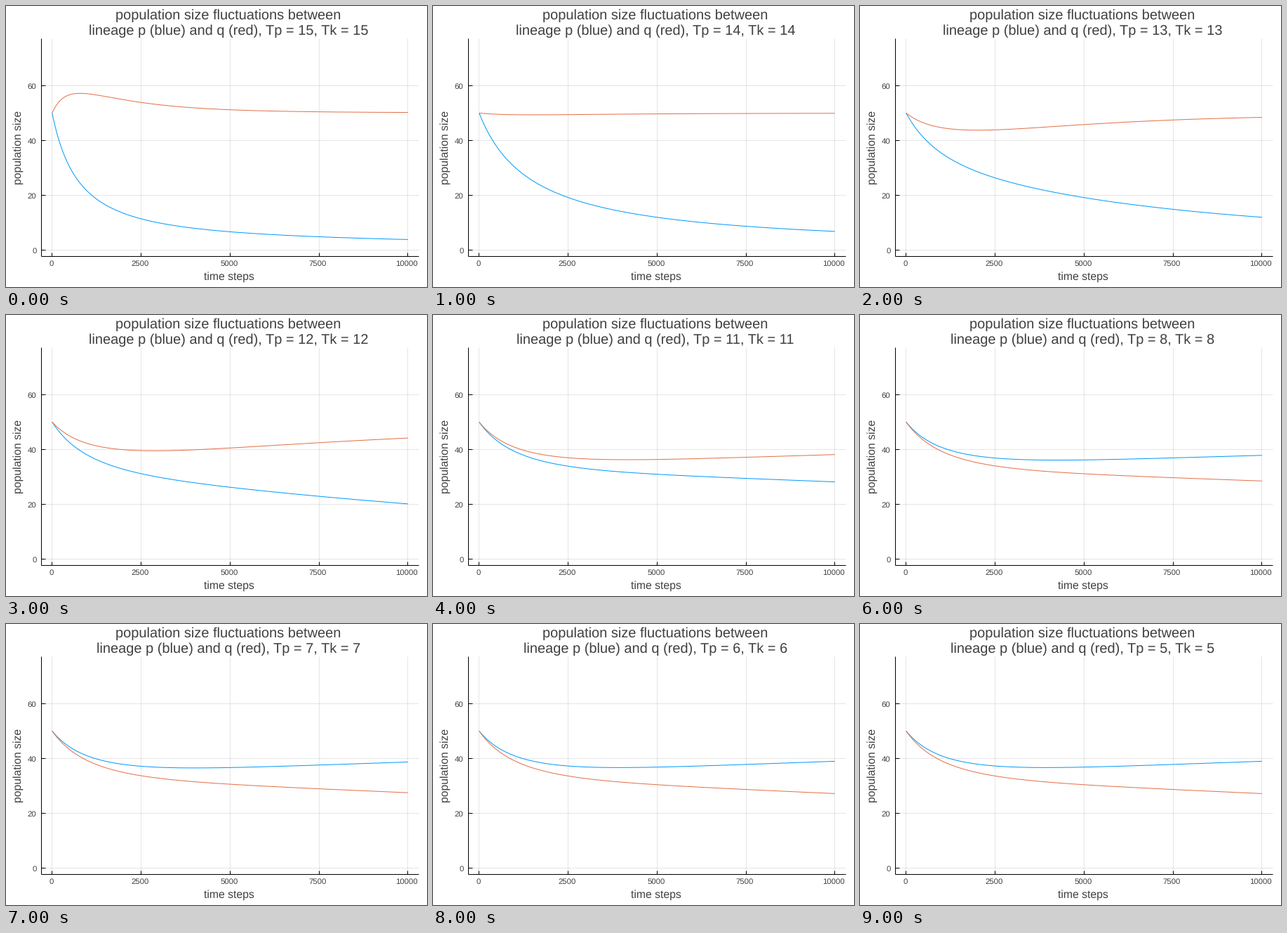
Recreate the animation shown at these times as a matplotlib script. Size 600x400 px, loop 10000 ms.

```python
import numpy as np
import matplotlib.pyplot as plt
from matplotlib.animation import FuncAnimation

W, H, DPI = 600, 400, 100
BLUE, RED, INK = "#009afa", "#e36f47", "#404040"

START, CAPACITY, GROWTH = 50, 50, 0.00069
STEPS, DT = 10000, 20
TEMPS = [t for t in range(15, 4, -1) if t != 10]

plt.rcParams["font.family"] = "Liberation Sans"
plt.rcParams["text.hinting"] = "none"


def advantage(temp):
    """Edge of lineage q over p; it vanishes at 10 and climbs steeply above."""
    x = temp - 10
    return 0.32 * (max(x + 3.8, 0) / (6.3 - x)) ** 1.5 - 0.15


def rates(p, q, temp):
    total = p + q
    skew = (max(temp - 10, 0) / 4) ** 3
    shift = advantage(temp) * (p * q / total) ** 2 * (2 * q / total) ** -skew
    scale = GROWTH / CAPACITY
    dp = scale * (p * (CAPACITY - p - q * q / total) - shift)
    dq = scale * (q * (CAPACITY - q - p * p / total) + shift)
    return np.array([dp, dq])


def simulate(temp):
    """Sizes of p and q over time, by the midpoint rule."""
    n = np.array([START, START], float)
    track = [n]
    for _ in range(STEPS // DT):
        mid = n + rates(*n, temp) * DT / 2
        n = n + rates(*mid, temp) * DT
        track.append(n)
    return np.transpose(track)


def px(t):
    return 65.8 + 0.0507 * t


def py(n):
    return 347.4 - 3.9 * n


def pt(pixels):
    return pixels * 72 / DPI


fig = plt.figure(figsize=(W / DPI, H / DPI), dpi=DPI, facecolor="white")
ax = fig.add_axes([0, 0, 1, 1])
ax.set_xlim(0, W)
ax.set_ylim(H, 0)
ax.axis("off")

LEFT, RIGHT, TOP, BOTTOM = 50, 588, 46, 356


def stroke(xs, ys, color="black", alpha=1, z=3):
    return ax.plot(xs, ys, color=color, alpha=alpha, lw=pt(1), zorder=z,
                   solid_capstyle="butt")[0]


def label(x, y, text, size, ha="center", **kw):
    return ax.text(x, y, text, fontsize=pt(size), color=INK, ha=ha,
                   va="baseline", **kw)


for t in range(0, STEPS + 1, 2500):
    x = np.floor(px(t))
    stroke([x, x], [TOP, BOTTOM], alpha=0.1, z=1)
    stroke([x, x], [BOTTOM - 5, BOTTOM])
    label(px(t) - 1.5, 370, str(t), 11.4)

for n in range(0, 61, 20):
    y = np.floor(py(n))
    stroke([LEFT, RIGHT], [y, y], alpha=0.1, z=1)
    stroke([LEFT, LEFT + 6], [y, y])
    label(43.5, py(n) + 4, str(n), 11.4, ha="right")

stroke([LEFT, RIGHT], [BOTTOM, BOTTOM])
stroke([LEFT, LEFT], [TOP, BOTTOM])

label(317, 19, "population size fluctuations between", 20)
title = label(317.2, 41, "", 20)
label(317.7, 390, "time steps", 15.7)
label(22, 201, "population size", 15.7, rotation=90, rotation_mode="anchor")

times = np.arange(0, STEPS + 1, DT)
line_p = stroke([], [], BLUE, z=4)
line_q = stroke([], [], RED, z=5)


def update(i):
    temp = TEMPS[i]
    for line, sizes in zip((line_p, line_q), simulate(temp)):
        line.set_data(px(times), py(sizes))
    title.set_text(f"lineage p (blue) and q (red), Tp = {temp}, Tk = {temp}")
    return line_p, line_q, title


anim = FuncAnimation(fig, update, frames=len(TEMPS), interval=1000,
                     repeat=True, repeat_delay=0, blit=False)
plt.show()
```
